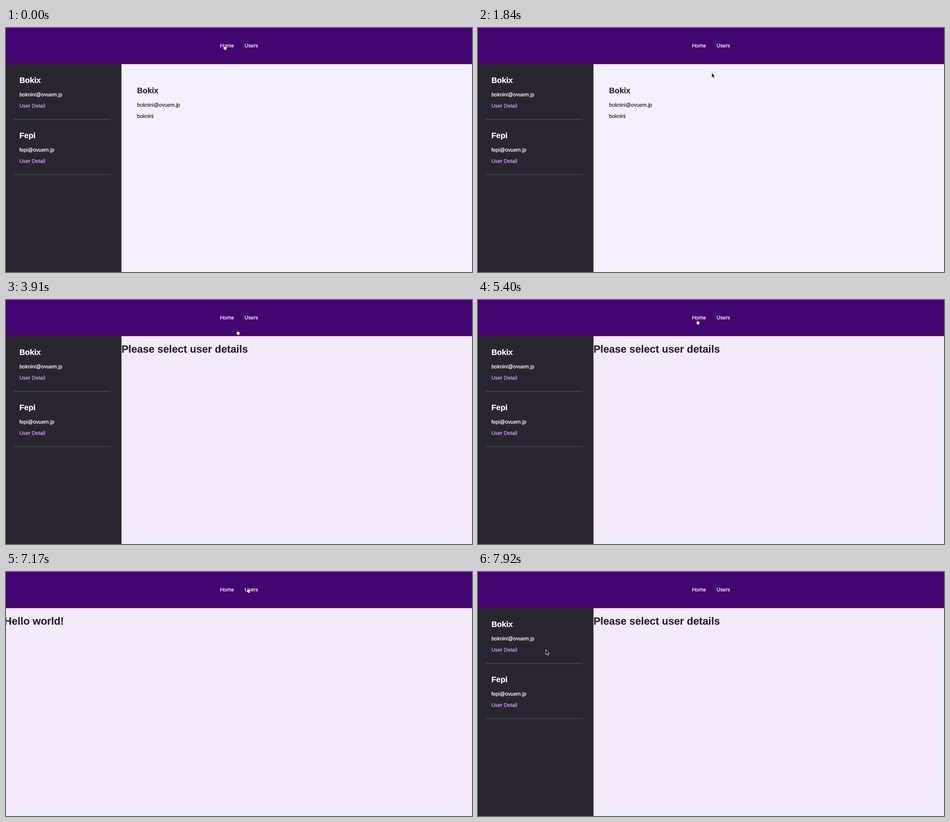
Write an HTML page that moves like this. It is 1032 by 543 pixels and loops after 8 s.

```html
<!DOCTYPE html>
<html lang="en">
<head>
<meta charset="utf-8">
<title>User pages</title>
<style>
  html, body { margin: 0; width: 100%; height: 100%; overflow: hidden; }
  svg { display: block; width: 100%; height: 100%; }
  text {
    font: 11.56px "Liberation Sans", Arial, sans-serif;
    text-rendering: geometricPrecision;
    color: #29252e; fill: currentColor;
    stroke: currentColor; stroke-width: .25;
  }
  .title { font-size: 23.12px; font-weight: bold; }
  .name { font-size: 17.34px; font-weight: bold; }
  .light text { color: #fff; }
  .light .link { color: #cda0fa; }
</style>
</head>
<body>
<svg viewBox="0 0 1032 543">
  <rect id="backdrop" width="1032" height="543"/>
  <g id="sidebar" class="light">
    <rect y="80" width="255.7" height="463" fill="#29252e"/>
  </g>
  <rect width="1032" height="80.4" fill="#43056f"/>
  <g class="light">
    <text x="474" y="43">Home</text>
    <text x="528.2" y="43">Users</text>
  </g>

  <text id="home" class="title" x="-4" y="117">Hello world!</text>
  <text id="users" class="title" x="255.7" y="117">Please select user details</text>
  <g id="detail">
    <text class="name" x="290.3" y="145.3">Bokix</text>
    <text x="290.3" y="174.7">boknini@ovuem.jp</text>
    <text x="290.3" y="199.8">boknini</text>
  </g>

  <g id="cursor" stroke-linejoin="round">
    <path id="arrow" d="M0 0V11L2.5 8.7L4.2 12.4L6 11.6L4.4 8H7.6Z" fill="#000" stroke="#fff" stroke-width=".9"/>
    <g id="hand" stroke="#000" stroke-width=".8">
      <path fill="#fff" d="M2.6 7V1.6Q2.6.6 3.4.6Q4.3.6 4.3 1.6V4.4Q5.2 3.9 5.8 4.7Q6.8 4.3 7.3 5.2Q8.7 4.8 9.2 6Q9.7 8 8.6 10V12.2H3.7Q3 10.3.9 8Q.3 6.8 1.2 6.3Q1.9 6.2 2.6 7Z"/>
      <path fill="none" stroke-width=".5" d="M4.6 8.2V10.4M6 8.2V10.4M7.4 8.2V10.4"/>
    </g>
  </g>
</svg>
<script>
const LOOP = 8000, FIRST_TICK = 1089, TICK = 148.2;
const el = id => document.getElementById(id);

const pages = [
  { from: -Infinity, id: "detail" },
  { from: 7, id: "home" },
  { from: 19, id: "users" },
  { from: 32, id: "home" },
  { from: 43, id: "users" }
];

// Each move is a cubic curve that starts where the previous one ended.
const origin = { x: 480, y: 37 };
const moves = [
  { begin: -1, end: 7, bend1: { x: 540, y: 144 }, bend2: { x: 542, y: 145 }, to: { x: 487, y: 42 } },
  { begin: 7, end: 11, bend1: { x: 510, y: 43 }, bend2: { x: 530, y: 38 }, to: { x: 539, y: 38 } },
  { begin: 18, end: 29, bend1: { x: 444, y: 162 }, bend2: { x: 151, y: 43 }, to: { x: 482, y: 43 } },
  { begin: 34, end: 41, bend1: { x: 42, y: 165 }, bend2: { x: 42, y: 165 }, to: { x: 532, y: 34.5 } },
  { begin: 44, end: 46, bend1: { x: 459, y: 89 }, bend2: { x: 300, y: 140 }, to: { x: 150.5, y: 173 } }
];

const cubic = (a, b, c, d, u) => {
  const v = 1 - u;
  return v * v * v * a + 3 * v * v * u * b + 3 * v * u * u * c + u * u * u * d;
};

function pointerAt(tick) {
  let point = origin;
  for (const { begin, end, bend1, bend2, to } of moves) {
    if (tick <= begin) break;
    const u = Math.min(1, (tick - begin) / (end - begin));
    const along = axis => cubic(point[axis], bend1[axis], bend2[axis], to[axis], u);
    point = { x: along("x"), y: along("y") };
  }
  return point;
}

const show = (id, visible) => el(id).style.display = visible ? "" : "none";

function addUser(top, name, mail) {
  el("sidebar").insertAdjacentHTML("beforeend", `
    <text class="name" x="29.7" y="${top + 42}">${name}</text>
    <text x="29.7" y="${top + 71.5}">${mail}</text>
    <text class="link" x="29.7" y="${top + 96.6}">User Detail</text>
    <rect x="18" y="${top + 122.3}" width="214" height="1.4" fill="#4a4650"/>`);
}
addUser(80, "Bokix", "boknini@ovuem.jp");
addUser(203.3, "Fepi", "fepi@ovuem.jp");

function draw(time) {
  // The screen refreshes in even ticks, so the pointer moves in steps.
  const tick = Math.floor((time % LOOP - FIRST_TICK) / TICK);
  const page = pages.findLast(({ from }) => from <= tick).id;
  for (const id of ["home", "users", "detail"]) show(id, id === page);
  show("sidebar", page !== "home");
  el("backdrop").setAttribute("fill", page === "detail" ? "#f3f0fc" : "#f4ebfa");

  const { x, y } = pointerAt(tick);
  const overMenu = x > 460 && y < 72;
  show("hand", overMenu);
  show("arrow", !overMenu);
  el("cursor").setAttribute("transform", `translate(${x} ${y})`);
}

const start = performance.now();
function frame() {
  draw(performance.now() - start);
  requestAnimationFrame(frame);
}
frame();
</script>
</body>
</html>
```
